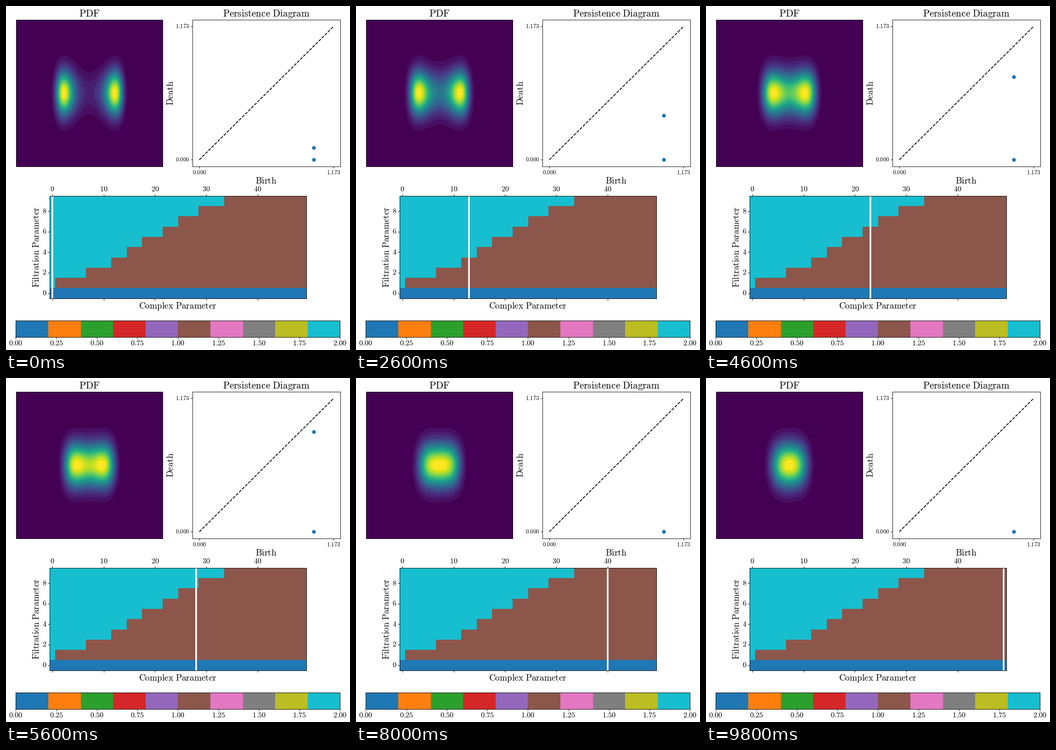
Write a matplotlib script that moves like this. It is 749x748 px and loops after 10000 ms.

```python
import matplotlib.pyplot as plt
import numpy as np
from matplotlib.animation import FuncAnimation

plt.rcParams["mathtext.fontset"] = "cm"

W, H, DPI = 749, 748, 64
STEPS, ROWS = 50, 10
TOP = 1.173
BLUE = "tab:blue"


def pt(pixels):
    return pixels * 72 / DPI


def stroke(width):
    """Line and marker sizes as drawn at 85 dots per inch."""
    return width * 85 / DPI


fig = plt.figure(figsize=(W / DPI, H / DPI), dpi=DPI, facecolor="white")


def panel(left, top, right, bottom, xlim, ylim):
    """Axes placed by pixel edges measured from the top left."""
    ax = fig.add_axes([left / W, 1 - bottom / H,
                       (right - left) / W, (bottom - top) / H])
    ax.set(xlim=xlim, ylim=ylim, xticks=[], yticks=[])
    ax.tick_params(length=stroke(3.5), width=stroke(0.8),
                   labelleft=False, labelbottom=False)
    for spine in ax.spines.values():
        spine.set_linewidth(stroke(0.8))
    return ax


def label(x, y, text, size, ha="center", va="baseline", rotation=0):
    body = text.replace(" ", r"\ ")
    fig.text(x / W, 1 - y / H, rf"$\mathrm{{{body}}}$", fontsize=pt(size),
             ha=ha, va=va, rotation=rotation, rotation_mode="anchor")


# Noisy oscillator: the double well closes as h rises through zero.
h = np.linspace(-1.5, 0.5, STEPS)
saddle = np.where(h < 0, np.exp(-h**2), 1)
split = saddle < 0.98

axis = np.linspace(-5, 5, 201)
X, Y = np.meshgrid(axis, axis)
levels = np.linspace(0, 1, 26)


def density(k):
    well = X**4 / 4 + h[k] * X**2 + Y**2 / 2
    floor = -h[k]**2 if h[k] < 0 else 0
    return np.clip(np.exp(floor - well), 0, 1)


# Density panel
pdf = panel(22, 29.7, 341, 348.9, (-5, 5), (-5, 5))
label(181.5, 23, "PDF", 21.2)

# Persistence panel
span = (-0.05 * TOP, 1.05 * TOP)
pers = panel(406.2, 29.7, 728.1, 348.9, span, span)
pers.set(xticks=[0, TOP], yticks=[0, TOP])
pers.plot([0, TOP], [0, TOP], "k--", lw=stroke(1.5))
dots, = pers.plot([], [], "o", color=BLUE, ms=stroke(6), mew=stroke(1))
label(566.5, 23, "Persistence Diagram", 21.1)
label(566.5, 386.5, "Birth", 19.4)
label(363.7, 189.5, "Death", 19.6, rotation=90)
for value, x, y in ((0, 421.3, 334.3), (TOP, 713.3, 44.3)):
    label(x, 365.5, f"{value:.3f}", 12.8)
    label(399.5, y, f"{value:.3f}", 12.8, ha="right", va="center")

# Component counts over both parameters
left, right, top, bottom = 95.4, 653.9, 412.7, 635.7
grid = panel(left, top, right, bottom,
             (-0.5, STEPS - 0.5), (-0.5, ROWS - 0.5))
grid.set(xticks=range(0, STEPS, 10), yticks=range(0, ROWS, 2))
grid.tick_params(axis="x", top=True)
cut = np.arange(ROWS)[:, None] / (ROWS - 1)
counts = np.where((saddle < cut) & split, 2, 1)
counts[0] = 0
grid.pcolormesh(np.arange(STEPS + 1) - 0.5, np.arange(ROWS + 1) - 0.5,
                counts, cmap="tab10", vmin=0, vmax=2)
cursor = grid.axvline(0, color="white", lw=stroke(3))
for n in range(0, STEPS, 10):
    label(left + (n + 0.5) * (right - left) / STEPS, 403, str(n), 16.2)
for n in range(0, ROWS, 2):
    y = bottom - (n + 0.5) * (bottom - top) / ROWS
    label(88.5, y, str(n), 16.2, ha="right", va="center")
label(373.5, 657.5, "Complex Parameter", 19.3)
label(72.2, 524.5, "Filtration Parameter", 19.2, rotation=90)

# Colour scale
bar = panel(21.3, 683.7, 727.4, 719.7, (0, 2), (0, 1))
bar.pcolormesh(np.linspace(0, 2, 11), [0, 1], np.arange(10)[None],
               cmap="tab10", vmin=0, vmax=9)
bar.set_xticks(np.linspace(0, 2, 9))
for value in np.linspace(0, 2, 9):
    label(21.3 + value * 353.05, 737.8, f"{value:.2f}", 16.2)


def draw(k):
    for old in list(pdf.collections):
        old.remove()
    # The colour range spans the band centres.
    pdf.contourf(X, Y, density(k), levels=levels, cmap="viridis",
                 vmin=0.02, vmax=0.98)
    deaths = [0, saddle[k]] if split[k] else [0]
    dots.set_data([1] * len(deaths), deaths)
    cursor.set_xdata([k, k])
    return dots, cursor


anim = FuncAnimation(fig, draw, frames=STEPS, interval=200, repeat=True,
                     repeat_delay=0, init_func=lambda: draw(0), blit=False)
plt.show()
```
